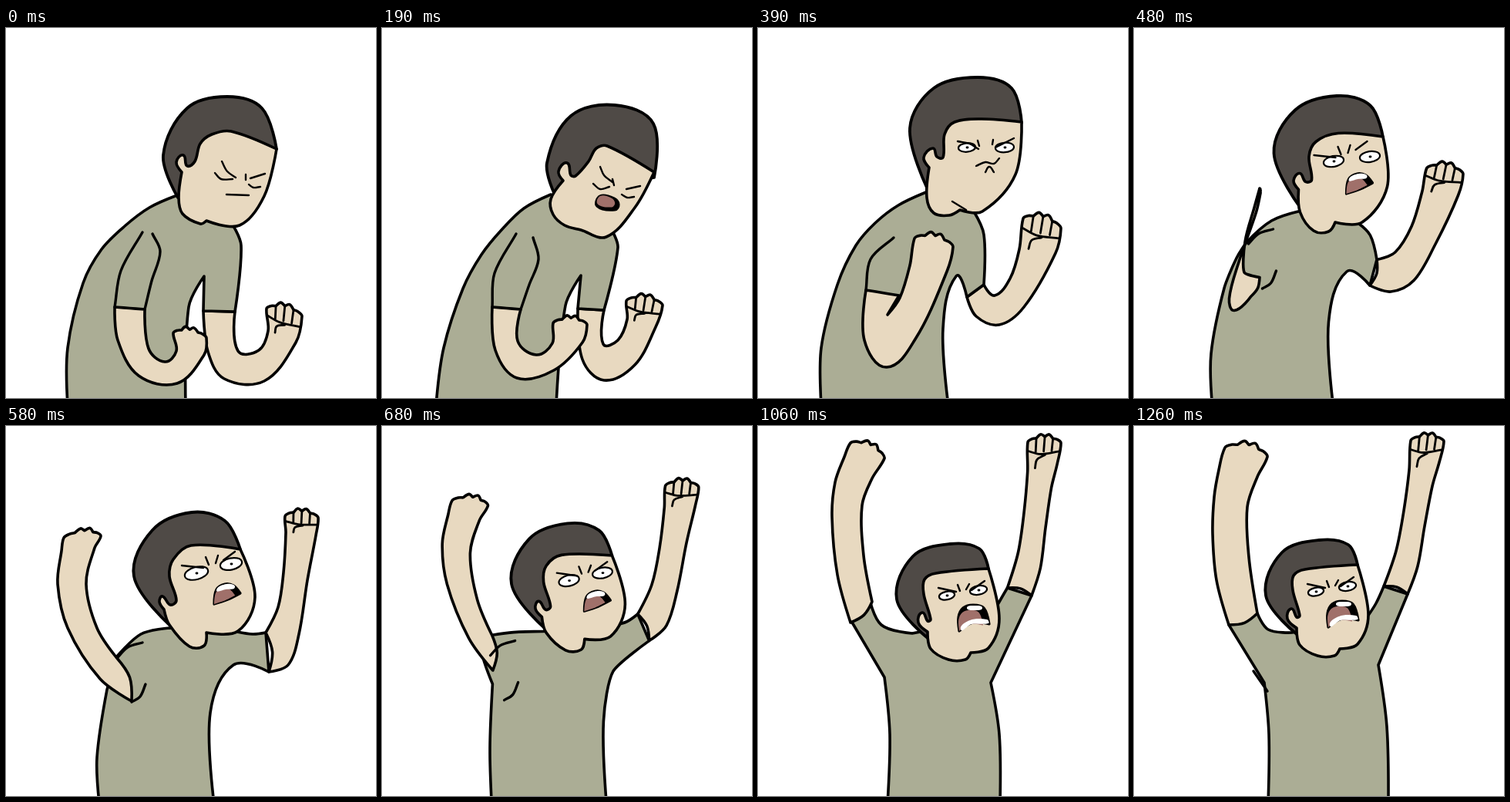
An HTML page that plays this animation: 480 by 480 pixels, repeating every 1360 ms.

```html
<!DOCTYPE html>
<html lang="en">
<head>
<meta charset="utf-8">
<title>Fist shake</title>
<style>
  html, body { margin: 0; width: 100%; height: 100%; overflow: hidden; background: #fff; }
  svg { display: block; width: 100vw; height: 100vh; }
  path { stroke: #000; stroke-linejoin: round; stroke-linecap: round; }
</style>
</head>
<body>
<svg id="stage" viewBox="0 0 480 480"></svg>
<script>
const LOOP = 1360;
const SKIN = '#e8d9c0', SHIRT = '#abad95', HAIR = '#4f4a46', TONGUE = '#a0706a';

// Curves are "x y" points; "!" marks a corner, "/" starts another curve.
const read = text => text.split('/').map(curve =>
  [...curve.matchAll(/(\d+) (\d+)(!?)/g)].map(m => [+m[1], +m[2], m[3] ? 0 : 1]));
const figure = parts => Object.fromEntries(
  Object.entries(parts).map(([key, text]) => [key, read(text)]));
const warp = (curves, fn) => curves.map(c => c.map((p, i) => [...fn(p, i, c.length), p[2]]));
const move = (curves, dx, dy) => warp(curves, ([x, y]) => [x + dx, y + dy]);

// Heads. Each eye is its centre and its right corner.
const calmHead = figure({
  hair: '351 157! 332 104 287 89 235 104 204 165 223 220!',
  face: '351 157! 335 218 303 256 260 250! 252 254 229 241 224 220 228 187! 221 174 230 165 235 179 245 173 252 150 267 138 292 134',
  lines: '280 173 287 186 298 194/311 190 311 197/336 189 317 195/271 188 279 196 294 196/315 203 321 207 330 206/286 216 315 217',
});
const groanHead = figure({
  hair: '353 194! 352 124 302 100 245 114 214 175 224 216!',
  face: '353 187! 328 233 291 271 258 262 237 256 222 242 219 222 235 198! 229 186 240 175 245 191 251 192 268 173 278 156 292 153',
  lines: '283 180 288 191 299 200/299 196 301 204/335 205 317 209/274 202 283 209 295 206/311 216 318 220 327 219',
  mouth: '283 218 301 221 307 229 302 236 279 231',
});
const glareHead = figure({
  hair: '342 123! 329 78 285 64 228 78 197 130 219 207!',
  face: '342 122! 334 190 291 238 262 236! 248 243 228 240 219 220 222 181! 215 168 227 156 232 167 240 168 242 138 255 122 290 118',
  eyes: '271 155 282 154/320 155 332 154',
  lines: '259 147 274 150 286 157/285 146 287 153/305 145 304 151/332 143 308 155/283 179 295 174 306 176 313 169/295 187 300 180 306 187/252 225 270 236',
});
const barkHead = figure({
  hair: '304 160! 284 123 241 112 190 135 166 195 212 258!',
  face: '304 160! 323 222 301 266 260 268! 257 285 238 286 212 258 205 238! 199 228 203 221 213 232 221 226 212 195 217 173 240 155',
  eyes: '247 191 262 187/292 179 306 176',
  lines: '228 181 256 184/259 170 263 180/275 168 272 178/297 163 282 174',
  mouth: '270 231! 273 212 284 205 295 207 304 217! 288 225',
  teeth: '273 213 286 205 297 209 285 212',
});
const yellHead = figure({
  hair: '290 180! 278 154 240 148 192 164 171 220 211 270!',
  face: '290 180! 304 245 290 283 267 289! 260 298 238 298 215 284 211 262! 199 250 204 237 211 248 215 246 206 213 207 194 222 186',
  eyes: '236 215 246 213/277 208 288 206',
  lines: '225 205 248 210/250 201 253 209/265 200 261 207/285 196 268 208',
  mouth: '252 261! 251 243 257 231 270 227 284 231 291 252! 270 250',
  teeth: '262 231 272 228 282 231 272 234/254 259 266 247 288 246 290 251 268 252',
});

// Arms run hem, elbow, wrist, two knuckles, wrist, inner elbow, hem.
const clench = { ...calmHead, ...figure({
  torso: '80 490! 80 415 100 331 124 287 154 257 186 233 222 217! 292 252! 305 282 257 322! 237 362 233 490!',
  armR: '256 367! 262 420 283 455 335 458 376 408 384 374 338 364 340 393 328 418 301 419 297 368!',
  armL: '141 362! 145 405 172 451 222 461 257 424 260 402 217 396 221 419 206 433 185 416 180 365!',
  sleeve: '141 362 149 315 177 265/180 365 189 328 200 290 190 267',
}) };
const crouch = { ...groanHead, ...figure({
  torso: '70 490! 80 415 105 338 129 294 155 262 184 234 219 216! 298 262! 306 285 258 321! 238 360 226 490!',
  armR: '254 364! 260 430 288 457 328 437 355 388 364 360 317 354 318 378 306 405 287 410 288 366!',
  armL: '143 362! 147 418 175 454 223 444 260 408 266 385 222 383 221 409 200 424 176 406 180 365!',
  sleeve: '143 362 146 318 174 267/180 365 191 333 203 300 196 272',
}) };
const glare = { ...glareHead, ...figure({
  torso: '82 490! 82 415 103 333 127 282 152 253 182 230 218 213! 280 238! 293 268 257 322 240 390 247 490!',
  armR: '271 349! 283 374 313 385 345 362 386 292 393 260 344 247 339 287 327 325 307 347 293 333!',
  armL: '140 340! 138 405 167 440 205 402 245 316 253 284 203 273 197 308 184 350 168 372! 183 347!',
  sleeve: '140 340 146 300 176 272',
}) };
const swing = { ...barkHead, ...figure({
  torso: '121 490! 118 430 131 342! 139 315 143 300! 175 270 212 262! 300 267! 320 270 295 310 265 372 270 490!',
  armR: '341 319! 366 310 380 270 391 200 402 142 405 119 362 117 363 138 360 190 353 235 337 268!',
  armL: '163 357! 122 328 80 262 67 205 72 162 75 145 123 143 115 158 104 205 118 262 143 300!',
  sleeve: '145 300 158 287 177 281/163 358 174 351 181 335',
}) };
const yell = { ...yellHead, ...figure({
  torso: '174 490! 173 400 162 324! 115 257! 143 228! 164 264 205 273! 302 245! 313 230 307 331! 321 400 323 490!',
  armR: '355 218! 368 182 377 130 387 78 396 47 402 20 359 19 357 57 350 110 340 162 324 208!',
  armL: '115 257! 98 195 91 120 95 75 107 42 115 24 159 44 143 70 130 105 132 170 143 230!',
  sleeve: '162 323 180 328',
}) };
const shake = { ...yell, ...figure({
  torso: '168 490! 171 400 164 326! 121 253! 144 222! 160 258 200 269! 302 250! 312 230 302 333! 313 400 314 490!',
}) };
for (const key in yellHead) shake[key] = move(yell[key], 9, 5);
shake.armR = warp(yell.armR, ([x, y]) => [x - (218 - y) / 22, y + 2]);
shake.armL = move(yell.armL, 5, -2);
delete shake.sleeve;
const raise = { ...yell, ...figure({
  torso: '174 490! 175 400 169 333! 123 258! 160 243! 174 264 205 268! 303 247! 314 230 317 310! 328 390 330 490!',
  armL: '123 258! 107 200 102 140 104 92 110 57 118 28 173 40 160 66 147 105 149 170 160 243!',
  sleeve: '155 318 173 344',
}) };

// Start time, pose, next pose, blend, sideways reach of the right arm.
const STEPS = [
  [0, clench], [100, clench, crouch, .5], [190, crouch], [290, crouch, glare, .5],
  [390, glare], [480, glare, swing, .5, 28], [580, swing], [680, swing, yell, .4, 7],
  [780, swing, yell, .8], [870, yell], [970, yell, shake, .5], [1060, shake],
  [1160, shake, raise, .5], [1260, raise],
];

const mix = (p, q, t) => p.map((v, i) => v + (q[i] - v) * t);
const alike = (a, b) => a.length === b.length && a.every((c, i) => c.length === b[i].length);

function blend(a, b, t, key) {
  const near = t < .5 ? a : b;
  if (!near[key]) return [];
  if (a[key] && b[key] && alike(a[key], b[key]))
    return a[key].map((c, i) => c.map((p, j) => mix(p, b[key][i][j], t)));
  // Curves that cannot be blended ride along with the body.
  const spot = pose => key === 'sleeve' ? pose.torso[0][5] : pose.face[0][1];
  const to = mix(spot(a), spot(b), t), from = spot(near);
  return move(near[key], to[0] - from[0], to[1] - from[1]);
}

// Adds four knuckles to an arm, and the finger lines that belong to them.
function arm([pts]) {
  const [wo, ko, ki, wi] = pts.slice(4, 8);
  const at = (u, v) => mix(mix(ki, ko, u), mix(wi, wo, u), v);
  const k = at(.5, 0), w = at(.5, 1);
  const len = Math.hypot(k[0] - w[0], k[1] - w[1]);
  const size = Math.hypot(ko[0] - ki[0], ko[1] - ki[1]);
  const knuckle = (u, out, bend) => {
    const p = at(u, 0), s = size * out * Math.sin(Math.PI * u) / len;
    return [p[0] + (k[0] - w[0]) * s, p[1] + (k[1] - w[1]) * s, bend];
  };
  const bumps = [];
  for (let i = 7; i > 0; i--) bumps.push(i % 2 ? knuckle(i / 8, .27, 1) : knuckle(i / 8, .18, .3));
  const fingers = [1, 2, 3].map(i => [knuckle(i / 4, .18, 1), at(i / 4, .35)]);
  fingers.push([at(0, .3), at(.4, .45), at(1, .4)], [at(.55, .5), at(.3, .65), at(.25, .95)]);

  // A raised sleeve shows its hem as an arc.
  const a = pts[10], b = pts[0], arc = b[1] - ko[1] > 100 ? .13 : 0;
  const hem = [(a[0] + b[0]) / 2 + (b[1] - a[1]) * arc, (a[1] + b[1]) / 2 - (b[0] - a[0]) * arc, 1];
  return { shape: [[...pts.slice(0, 6), ...bumps, ...pts.slice(6), hem]], fingers };
}

const eye = ([c, r]) => {
  const dx = r[0] - c[0], dy = r[1] - c[1];
  return [[dx, dy], [-dy * .52, dx * .52], [-dx, -dy], [dy * .52, -dx * .52]]
    .map(([x, y]) => [c[0] + x, c[1] + y, 1]);
};
const tongue = c => c.map(p => [...mix(c[0], p, .8).slice(0, 2), p[2]]);

function handle(p, prev, next, len) {
  const dx = next[0] - prev[0], dy = next[1] - prev[1];
  const s = (p[2] ?? 1) * len / 3 / (Math.hypot(dx, dy) || 1);
  return [p[0] + dx * s, p[1] + dy * s];
}

function curvePath(pts, closed) {
  const n = pts.length, last = closed ? n : n - 1;
  const get = i => closed ? pts[(i + n) % n] : pts[Math.max(0, Math.min(n - 1, i))];
  const put = p => p[0].toFixed(1) + ' ' + p[1].toFixed(1);
  let d = 'M' + put(pts[0]);
  for (let i = 0; i < last; i++) {
    const p = get(i), q = get(i + 1);
    const len = Math.hypot(q[0] - p[0], q[1] - p[1]);
    d += 'C' + [handle(p, get(i - 1), q, len), handle(q, get(i + 2), p, len), q].map(put).join(' ');
  }
  return closed ? d + 'Z' : d;
}

const stage = document.getElementById('stage');
const make = (tag, parent, attrs) => {
  const el = document.createElementNS('http://www.w3.org/2000/svg', tag);
  for (const name in attrs) el.setAttribute(name, attrs[name]);
  return parent.appendChild(el);
};

function drawPose(group, a, b, t, reach) {
  const part = key => blend(a, b, t, key);
  const draw = (curves, fill, width) => {
    const d = curves.map(c => curvePath(c, fill !== 'none')).join('');
    if (d) make('path', group, { d, fill, 'stroke-width': width });
  };
  const right = arm(warp(part('armR'), ([x, y], i, n) =>
    [x + reach * Math.sin(Math.PI * i / (n - 1)), y]));
  const pts = part('torso')[0], sleeve = right.shape[0];
  const hemLow = sleeve[0], hemTop = sleeve[sleeve.length - 2];
  const eyes = part('eyes'), mouth = part('mouth');

  draw(right.shape, SKIN, 3.6);
  draw(right.fingers, 'none', 2.8);
  draw([[...pts.slice(0, 9), hemTop, hemLow, ...pts.slice(9)]], SHIRT, 3.6);
  draw(arm(part('armL')).shape, SKIN, 3.6);
  draw(part('sleeve'), 'none', 3.4);
  draw(part('hair'), HAIR, 3.8);
  draw(part('face'), SKIN, 3.6);
  draw(eyes.map(eye), '#fff', 2.2);
  draw(eyes.map(([c]) => [c, [c[0] + 1, c[1]]]), 'none', 2.8);
  draw(part('lines'), 'none', 2.4);
  draw(mouth, '#000', 3.2);
  draw(mouth.map(tongue), TONGUE, 0);
  draw(part('teeth'), '#fff', 0);
}

STEPS.forEach(([start, a, b = a, t = 0, reach = 0], i) => {
  const group = make('g', stage, { opacity: 0 });
  drawPose(group, a, b, t, reach);
  const end = i + 1 < STEPS.length ? STEPS[i + 1][0] : LOOP;
  const key = (time, opacity) => ({ offset: time / LOOP, opacity, easing: 'step-end' });
  const keys = [key(start, 1), key(end, end < LOOP ? 0 : 1)];
  if (start > 0) keys.unshift(key(0, 0));
  if (end < LOOP) keys.push(key(LOOP, 0));
  group.animate(keys, { duration: LOOP, iterations: Infinity });
});
</script>
</body>
</html>
```
